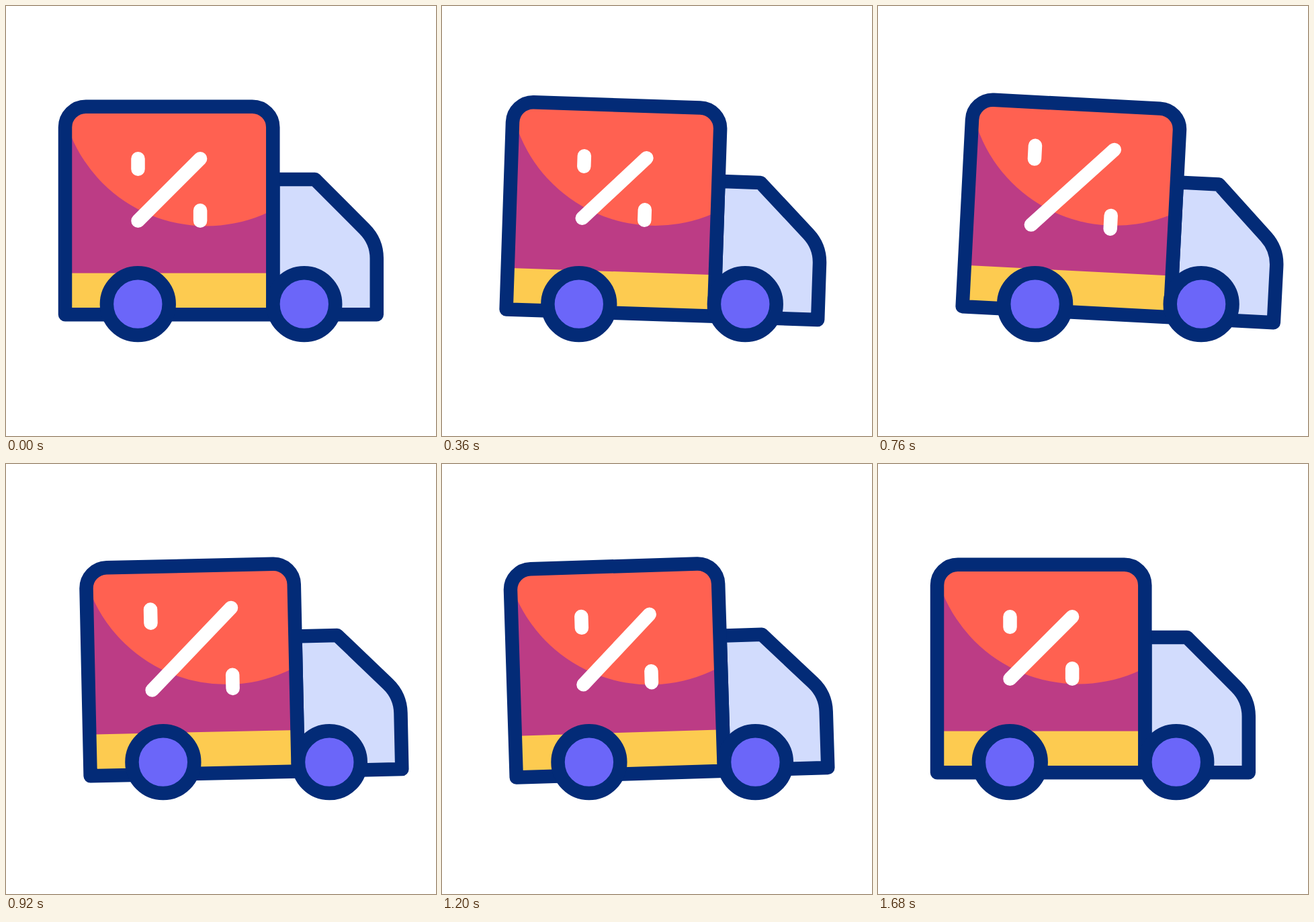
Recreate the animation shown at these times as an HTML page. Size 640 by 640 pixels, loop 1.72 s.

```html
<!DOCTYPE html>
<html lang="en">
<head>
<meta charset="utf-8">
<title>Delivery truck</title>
<style>
  html, body { margin: 0; width: 100%; height: 100%; overflow: hidden; background: #fff; }
  svg { display: block; width: 100%; height: 100%; }
  .line { stroke: #032b77; stroke-width: 20.5; stroke-linecap: round; stroke-linejoin: round; }
</style>
</head>
<body>
<svg viewBox="0 0 640 640">
  <defs>
    <path id="box" d="M88 459.2V180.6a30.8 30.8 0 0 1 30.8-30.8H366.5a30.8 30.8 0 0 1 30.8 30.8V459.2Z"/>
    <clipPath id="inside"><use href="#box"/></clipPath>
  </defs>
  <g id="body">
    <path class="line" fill="#d2dcfd" d="M397.3 258.1H459.8L533.6 331.9A61.9 61.9 0 0 1 551.8 375.7V459.2H397.3Z"/>
    <g clip-path="url(#inside)">
      <rect x="78" y="140" width="330" height="330" fill="#bc3c85"/>
      <circle cx="298" cy="109.5" r="218" fill="#ff6151"/>
      <rect x="78" y="397.6" width="330" height="72" fill="#fdcb50"/>
    </g>
    <use href="#box" class="line" fill="none"/>
    <path id="percent" fill="none" stroke="#fff" stroke-width="20.5" stroke-linecap="round"/>
  </g>
  <g id="wheels" class="line" fill="#6b66f9">
    <circle cx="196.3" cy="443.7" r="46.4"/>
    <circle cx="443.8" cy="443.7" r="46.4"/>
  </g>
</svg>
<script>
const LOOP = 1720, STEP = 40;

// [time, value] keys; every segment eases in and out
const tracks = {
  shift: { pull: 0.6, keys: [[90, 0], [850, 37.9], [1610, 0]] },
  tilt:  { pull: 0.6, keys: [[115, 0], [612, 4], [1050, -2], [1600, 0]] },
  zoom:  { pull: 0.5, keys: [[340, 1], [880, 1.298], [1420, 1]] }
};

const $ = id => document.getElementById(id);
const body = $('body'), wheels = $('wheels'), percent = $('percent');

// cubic-bezier(pull, 0, 1 - pull, 1)
function ease(x, pull) {
  let lo = 0, hi = 1, s = 0.5;
  for (let i = 0; i < 24; i++) {
    s = (lo + hi) / 2;
    const r = 1 - s;
    const bx = 3 * r * r * s * pull + 3 * r * s * s * (1 - pull) + s * s * s;
    if (bx < x) lo = s; else hi = s;
  }
  return s * s * (3 - 2 * s);
}

function valueAt({ pull, keys }, t) {
  if (t <= keys[0][0]) return keys[0][1];
  for (let i = 1; i < keys.length; i++) {
    const [t0, a] = keys[i - 1], [t1, b] = keys[i];
    if (t < t1) return a + (b - a) * ease((t - t0) / (t1 - t0), pull);
  }
  return keys[keys.length - 1][1];
}

// The sign grows while its stroke keeps its width
function signPath(zoom) {
  const p = (x, y) => `${242.8 + x * zoom} ${273.5 + y * zoom}`;
  const far = 46.3, near = 30.8;
  return `M${p(-far, far)}L${p(far, -far)}` +
         `M${p(-far, -far)}L${p(-far, -near)}` +
         `M${p(far, near)}L${p(far, far)}`;
}

function draw(t) {
  const shift = valueAt(tracks.shift, t);
  const tilt = valueAt(tracks.tilt, t);
  body.setAttribute('transform', `translate(${shift} 0) rotate(${tilt} 320 459.2)`);
  wheels.setAttribute('transform', `translate(${shift} 0)`);
  percent.setAttribute('d', signPath(valueAt(tracks.zoom, t)));
}

const start = performance.now();
function tick() {
  const t = (performance.now() - start) % LOOP;
  draw(Math.floor(t / STEP) * STEP);
  requestAnimationFrame(tick);
}
tick();
</script>
</body>
</html>
```
